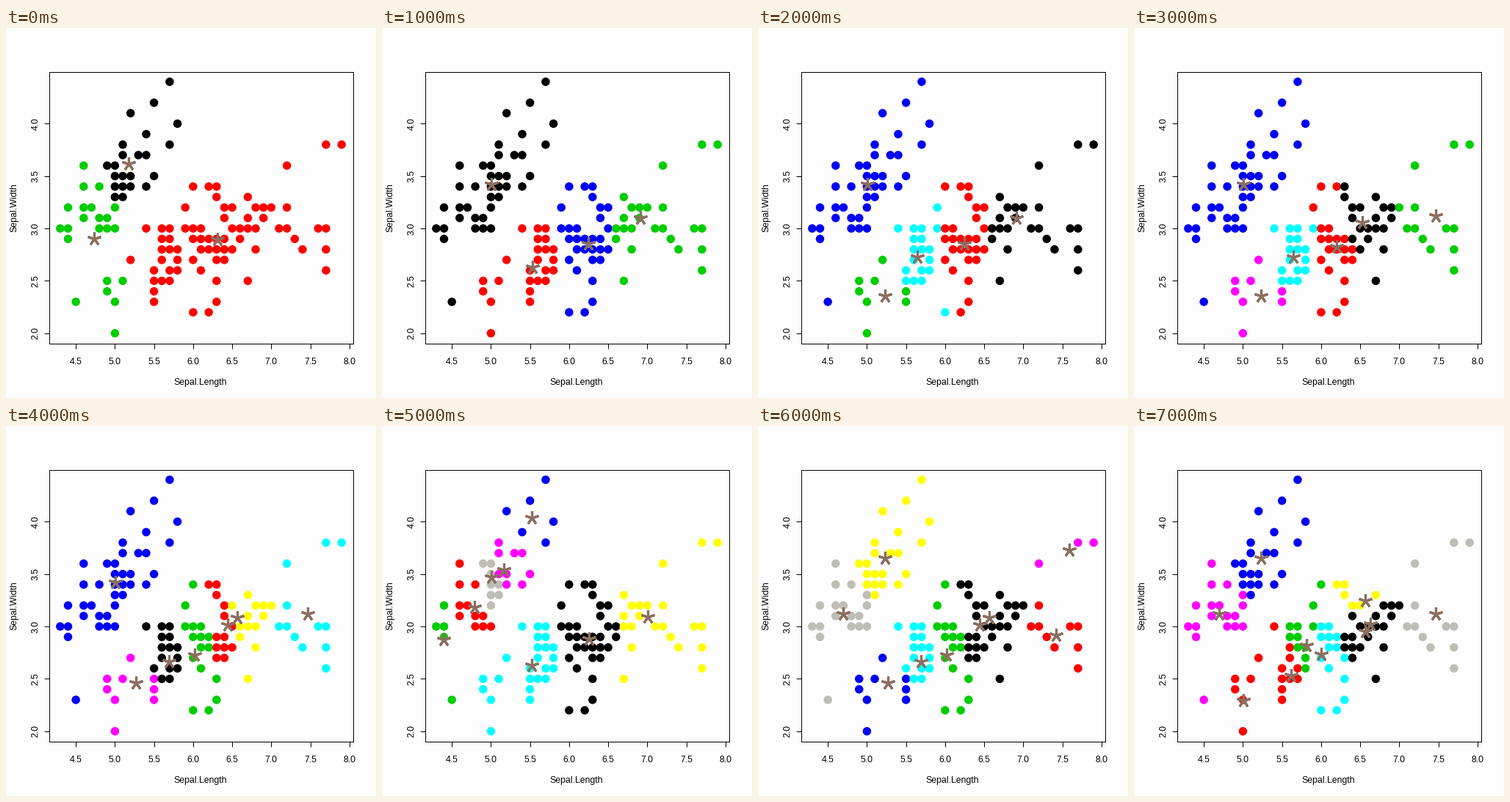
These frames come from a looping animation (504 px wide and 504 px high, 8000 ms). A matplotlib script:

```python
import matplotlib.pyplot as plt
import numpy as np
from matplotlib.animation import FuncAnimation

SIZE = 504
PAPER = "#fdfdfd"
STAR = "#8b6f60"
# black, red, green, blue, cyan, magenta, yellow, grey; reused after eight
PALETTE = ["#000000", "#ff0000", "#00cd00", "#0000f4",
           "#00ffff", "#ff00ff", "#ffff00", "#bebeb6"]
LEFT, RIGHT, TOP, BOTTOM = 58.5, 472.5, 59.5, 429.5
X0, X1, Y0, Y1 = 4.156, 8.044, 1.904, 4.496

plt.rcParams["font.family"] = "Liberation Sans"

# Measurements sit on a lattice of tenths: width -> lengths or runs of them
ROWS = {
    44: [57], 42: [55], 41: [52], 40: [58], 39: [54],
    38: [51, 57, 77, 79],
    37: [51, (53, 54)],
    36: [46, (49, 50), 72],
    35: [(50, 52), 55],
    34: [46, 48, (50, 52), 54, 60, (62, 63)],
    33: [(50, 51), 63, 67],
    32: [44, (46, 47), 50, 59, (64, 65), (68, 70), 72],
    31: [46, (48, 49), 64, 67, 69],
    30: [(43, 44), (48, 50), 54, (56, 57), (59, 61), (65, 68),
         (71, 72), (76, 77)],
    29: [44, (56, 57), (60, 64), 66, 73],
    28: [(56, 58), (61, 65), 68, 74, 77],
    27: [52, 56, 58, 60, (63, 64)],
    26: [55, (57, 58), 61, 77],
    25: [49, 51, (55, 57), 63, 67],
    24: [49, 55], 23: [45, 50, 55, 63], 22: [60, 62], 20: [50],
}


def lattice():
    for y, runs in ROWS.items():
        for run in runs:
            first, last = run if isinstance(run, tuple) else (run, run)
            for x in range(first, last + 1):
                yield x / 10, y / 10


POINTS = np.array(list(lattice()))

# Cluster means that several steps share
SMALL, SMALL_LOW, SMALL_HIGH = (5.006, 3.428), (4.70, 3.122), (5.234, 3.659)
FAR, BIG, MID = (7.475, 3.125), (6.912, 3.10), (6.252, 2.855)
LOW, LOWEST = (5.647, 2.73), (5.234, 2.361)
A, B, C, D, E = ((6.565, 3.087), (6.443, 3.017), (6.021, 2.731),
                 (5.70, 2.668), (5.271, 2.466))

# One step per cluster count, means in palette order
STEPS = [
    [(5.176, 3.624), (6.315, 2.896), (4.738, 2.905)],
    [SMALL, (5.532, 2.636), BIG, MID],
    [BIG, MID, LOWEST, SMALL, LOW],
    [(6.529, 3.058), (6.2, 2.83), FAR, SMALL, LOW, LOWEST],
    [D, B, C, SMALL, FAR, E, A],
    [(6.256, 2.884), (4.793, 3.184), (4.40, 2.877), (5.524, 4.043),
     (5.524, 2.633), (5.168, 3.547), (7.006, 3.094), (5.006, 3.477)],
    [A, (7.428, 2.92), C, E, D, (7.596, 3.736), SMALL_HIGH, SMALL_LOW, B],
    [(6.631, 3.024), (5.618, 2.536), (5.815, 2.821), SMALL_HIGH,
     (6.002, 2.738), SMALL_LOW, (6.565, 3.247), FAR,
     (6.565, 2.954), (5.006, 2.298)],
]


def small_kind(p):
    """True on the side of the line where the short, wide species lies."""
    return p[:, 0] < 2.86 + 0.8 * p[:, 1]


def colours(means):
    """Colour each point by its nearest mean; crossing species costs extra."""
    gap = POINTS[:, None] - means
    dist = 2 * gap[..., 0] ** 2 + gap[..., 1] ** 2
    dist += 2.2 * (small_kind(POINTS)[:, None] != small_kind(means))
    return [PALETTE[i % len(PALETTE)] for i in dist.argmin(axis=1)]


def label(x, y, text, angle=0):
    fig.text(x / SIZE, 1 - y / SIZE, text, fontsize=12.3, color="black",
             ha="center", va="baseline", rotation=angle,
             rotation_mode="anchor")


fig = plt.figure(figsize=(7, 7), dpi=72, facecolor=PAPER)
ax = fig.add_axes([LEFT / SIZE, 1 - BOTTOM / SIZE,
                   (RIGHT - LEFT) / SIZE, (BOTTOM - TOP) / SIZE],
                  facecolor=PAPER)
ax.set(xlim=(X0, X1), ylim=(Y0, Y1))
xticks, yticks = np.arange(4.5, 8.1, 0.5), np.arange(2, 4.1, 0.5)
ax.set_xticks(xticks, [""] * len(xticks))
ax.set_yticks(yticks, [""] * len(yticks))
ax.tick_params(length=7.2, width=1)
for spine in ax.spines.values():
    spine.set_linewidth(1)

for v in xticks:
    label(LEFT + (v - X0) / (X1 - X0) * (RIGHT - LEFT), 457.5, f"{v:.1f}")
for v in yticks:
    label(43.5, BOTTOM - (v - Y0) / (Y1 - Y0) * (BOTTOM - TOP), f"{v:.1f}", 90)
label(265, 486, "Sepal.Length")
label(14, 244.5, "Sepal.Width", 90)

dots = ax.scatter(*POINTS.T, s=11.5 ** 2, linewidths=0, zorder=3)
stars, = ax.plot([], [], ls="", marker=(5, 2, 0), ms=18.8, mew=3.2,
                 color=STAR, zorder=4)


def draw(i):
    means = np.array(STEPS[i])
    dots.set_facecolor(colours(means))
    stars.set_data(*(means - 0.004).T)
    return dots, stars


anim = FuncAnimation(fig, draw, frames=len(STEPS), interval=1000,
                     repeat=True, repeat_delay=0)
plt.show()
```
